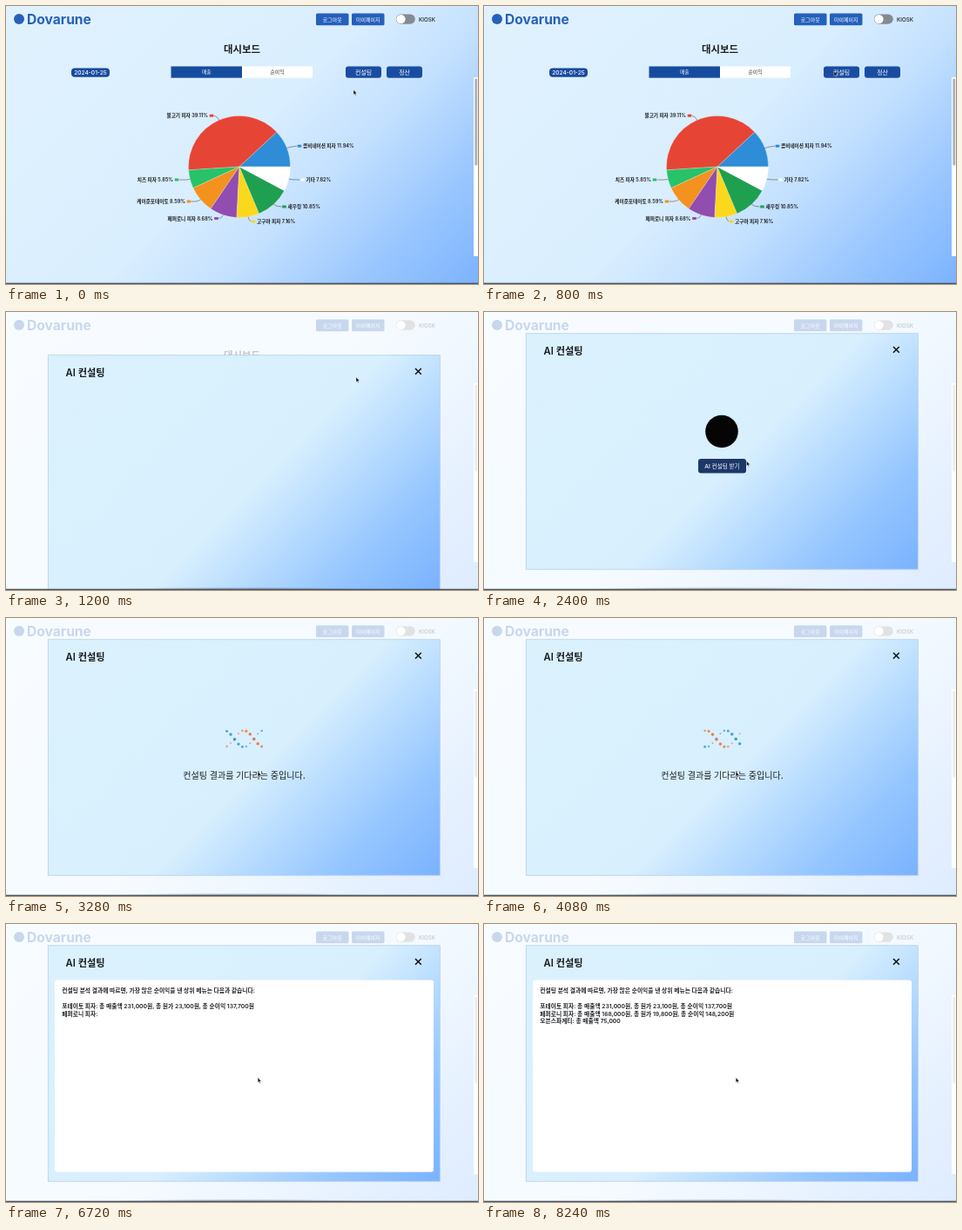
Animation, 542 px wide and 320 px high, one loop 8320 ms. Source, as an HTML page:

```html
<!DOCTYPE html>
<html lang="ko">
<head>
<meta charset="utf-8">
<title>대시보드</title>
<style>
  html, body { margin: 0; width: 100%; height: 100%; overflow: hidden; background: #dff1fe; }
  svg { display: block; width: 100%; height: 100%; }
  text { font-family: Inter, "Noto Sans CJK KR", "Noto Sans CJK", sans-serif; white-space: pre; }
</style>
</head>
<body>
<svg id="stage" viewBox="0 0 542 320" xmlns="http://www.w3.org/2000/svg">
  <defs>
    <linearGradient id="pageFill" gradientUnits="userSpaceOnUse" x1="55.5" y1="-55.5" x2="486.5" y2="375.5">
      <stop offset="0" stop-color="#e1f2fe"/><stop offset=".5" stop-color="#d9eefe"/>
      <stop offset=".66" stop-color="#c3e0ff"/><stop offset=".84" stop-color="#99c6ff"/>
      <stop offset="1" stop-color="#7cb3ff"/>
    </linearGradient>
    <linearGradient id="modalFill" gradientUnits="userSpaceOnUse" x1="92.5" y1="-20" x2="453.5" y2="341">
      <stop offset="0" stop-color="#dbf2fd"/><stop offset=".54" stop-color="#d8effe"/>
      <stop offset=".66" stop-color="#bbdeff"/><stop offset=".83" stop-color="#94c5ff"/>
      <stop offset="1" stop-color="#7ab2ff"/>
    </linearGradient>
    <radialGradient id="dockFill">
      <stop offset="0" stop-color="#4b5865" stop-opacity=".4"/>
      <stop offset=".6" stop-color="#4b5865" stop-opacity=".25"/>
      <stop offset="1" stop-color="#4b5865" stop-opacity="0"/>
    </radialGradient>
  </defs>
</svg>
<script>
const LOOP = 8320;
const stage = document.getElementById('stage');

function add(parent, tag, attrs, content) {
  const node = document.createElementNS('http://www.w3.org/2000/svg', tag);
  for (const key in attrs) node.setAttribute(key, attrs[key]);
  if (content !== undefined) node.textContent = content;
  parent.appendChild(node);
  return node;
}
const group = parent => add(parent, 'g', {});
const box = (parent, x, y, width, height, fill, rx = 0) =>
  add(parent, 'rect', { x, y, width, height, fill, rx });
// Text is placed by its vertical centre.
const label = (parent, x, cy, size, content, fill = '#222', weight = 500, anchor = 'start') =>
  add(parent, 'text', { x, y: cy + size * 0.36, 'font-size': size, fill, 'font-weight': weight,
    'text-anchor': anchor }, content);
function button(parent, x, y, w, h, fill, size, content, rx, weight = 500) {
  const rect = box(parent, x, y, w, h, fill, rx);
  label(parent, x + w / 2, y + h / 2, size, content, '#fff', weight, 'middle');
  return rect;
}
const show = (node, on) => node.setAttribute('visibility', on ? 'inherit' : 'hidden');

function drawHeader(page) {
  add(page, 'circle', { cx: 15, cy: 15, r: 6, fill: '#2760b8' });
  label(page, 24, 15.5, 15.6, 'Dovarune', '#2760b8', 700);
  button(page, 356, 8.5, 37.5, 13.8, '#2560ba', 6, '로그아웃', 1.5);
  button(page, 397, 8.5, 37.5, 13.8, '#2560ba', 6, '마이페이지', 1.5);
  box(page, 447.8, 9.5, 22, 11.2, '#858a90', 5.6);
  add(page, 'circle', { cx: 453.5, cy: 15.1, r: 5.2, fill: '#fff' });
  label(page, 474, 15.3, 6.2, 'KIOSK');

  label(page, 271, 50.2, 11.4, '대시보드', '#1b1d20', 600, 'middle');
  button(page, 75, 71.5, 44, 10.2, '#184a9f', 6.6, '2024-01-25', 4);
  button(page, 189.5, 69.5, 81.5, 13.2, '#164c9f', 5.8, '매출', 0);
  box(page, 271, 69.5, 81, 13.2, '#fff');
  label(page, 311.5, 76.1, 5.8, '순이익', '#333', 500, 'middle');
  button(page, 390, 69.5, 41, 13.2, '#1a4da1', 6.9, '컨설팅', 3);
  button(page, 437, 69.5, 41, 13.2, '#1a4da1', 6.9, '정산', 3);
}

function drawPie(page) {
  const cx = 268, cy = 185, r = 58.5;
  // name, percent, colour, label x, label y, side of the marker
  const slices = [
    ['콤비네이션 피자', 11.94, '#2e8dd6', 341, 161.2, 1],
    ['불고기 피자', 39.11, '#e64536', 232, 126.2, -1],
    ['치즈 피자', 5.85, '#28c268', 192, 200, -1],
    ['케이준포테이토', 8.59, '#f3921f', 206, 225, -1],
    ['페퍼로니 피자', 8.68, '#914db0', 237.5, 244.5, -1],
    ['고구마 피자', 7.16, '#fbd81d', 288, 248, 1],
    ['새우링', 10.85, '#1f9f50', 323.5, 231, 1],
    ['기타', 7.82, '#ffffff', 344.5, 200, 1]
  ];
  const point = (percent, radius) => {
    const a = -percent / 50 * Math.PI;
    return [cx + radius * Math.cos(a), cy + radius * Math.sin(a)];
  };
  let start = 0;
  for (const [name, percent, fill, x, y, side] of slices) {
    const end = start + percent, mid = (start + end) / 2;
    add(page, 'path', { fill, stroke: '#fff', 'stroke-width': .35, 'stroke-opacity': .7,
      d: `M${cx},${cy}L${point(start, r)}A${r},${r} 0 0 0 ${point(end, r)}Z` });
    const markX = x - side * 4;
    add(page, 'path', { fill: 'none', stroke: '#555', 'stroke-width': .6,
      d: `M${point(mid, r)}Q${point(mid, r + 4)} ${markX - side * 3},${y}` });
    box(page, markX - 2.3, y - 1.5, 4.6, 3, fill);
    label(page, x, y, 5.65, `${name} ${percent}%`, '#1c1c1c', 600, side > 0 ? 'start' : 'end');
    start = end;
  }
}

// Dashboard
const page = group(stage);
box(page, 0, 0, 542, 320, 'url(#pageFill)');
drawHeader(page);
drawPie(page);
box(page, 537, 82, 5, 206, '#fff');
box(page, 538.3, 83.5, 3, 100, '#aeb3b8', 1.5);

// Dialog
const overlay = group(stage);
box(overlay, 0, 0, 542, 320, '#fff').setAttribute('fill-opacity', .75);
const modal = group(overlay);
const frame = box(modal, 48.3, 24.8, 450, 271.4, 'url(#modalFill)');
frame.setAttribute('stroke', '#b2cfec');
frame.setAttribute('stroke-width', .8);
label(modal, 68.6, 44.6, 11.2, 'AI 컨설팅', '#16191d', 600);
add(modal, 'path', { d: 'M470,40l6.8,6.8m0,-6.8l-6.8,6.8', stroke: '#111', 'stroke-width': 1.5 });

const intro = group(modal);
add(intro, 'circle', { cx: 273, cy: 137.5, r: 18.8, fill: '#050505' });
const askButton = button(intro, 246, 169, 55, 16.6, '#1a4da1', 6.6, 'AI 컨설팅 받기', 3);

const waiting = group(modal);
label(waiting, 273.5, 181.3, 10.05, '컨설팅 결과를 기다리는 중입니다.', '#1d2126', 500, 'middle');
const dots = [];
for (let i = 0; i < 10; i++)
  for (const side of [1, -1])
    dots.push({ x: 253.6 + i * 4.45, side,
      node: add(waiting, 'circle', { fill: side > 0 ? '#f0783c' : '#3f9bd0' }) });

const result = group(modal);
box(result, 56, 64.5, 435, 221, '#fff', 3);
const answer = [
  '컨설팅 분석 결과에 따르면, 가장 많은 순이익을 낸 상위 메뉴는 다음과 같습니다:',
  '',
  '포테이토 피자: 총 매출액 231,000원, 총 원가 23,100원, 총 순이익 137,700원',
  '페퍼로니 피자: 총 매출액 168,000원, 총 원가 19,800원, 총 순이익 148,200원',
  '오븐스파게티: 총 매출액 75,000'
];
const lines = answer.map((_, i) => label(result, 64.3, 77 + i * 8.7, 6.75, '', '#1e2125', 600));

add(overlay, 'ellipse', { cx: 268, cy: 319.5, rx: 150, ry: 3, fill: 'url(#dockFill)' });
box(stage, 0, 318.7, 542, 1.3, '#465361');

const cursor = add(stage, 'path', { d: 'M0,0V5.6L1.3,4.5L2.2,6.5L3.1,6.1L2.2,4.2L3.9,4.1Z',
  fill: '#111', stroke: '#fff', 'stroke-width': .35 });

const smooth = u => u * u * (3 - 2 * u);
const linear = u => u;

// Interpolates rows of [time, ...values].
function track(keys, t, ease) {
  if (t <= keys[0][0]) return keys[0].slice(1);
  for (let i = 1; i < keys.length; i++) {
    const a = keys[i - 1], b = keys[i];
    if (t <= b[0]) {
      const u = ease((t - a[0]) / (b[0] - a[0]));
      return a.slice(1).map((v, k) => v + (b[k + 1] - v) * u);
    }
  }
  return keys[keys.length - 1].slice(1);
}

// The CSS "ease" curve.
function cssEase(x) {
  if (x <= 0) return 0;
  if (x >= 1) return 1;
  let lo = 0, hi = 1, s;
  for (let i = 0; i < 24; i++) {
    s = (lo + hi) / 2;
    if (.75 * s * (1 - s) + s ** 3 < x) lo = s; else hi = s;
  }
  return .3 * s * (1 - s) ** 2 + 3 * s * s * (1 - s) + s ** 3;
}

const OPEN = 819, SLIDE = 600, ASK = 2880, ANSWER = 4200;
const cursorKeys = [[80, 399, 96.5], [560, 402, 75], [1740, 402, 75],
  [2400, 301.5, 171.5], [2600, 289.2, 176.8]];
const typingKeys = [[ANSWER, 0], [4320, 5], [4960, 31.5], [5200, 44], [6080, 83.5],
  [6720, 109.3], [7840, 158.2], [8220, 175]];

function render(t) {
  show(overlay, t >= OPEN);
  modal.setAttribute('transform', `translate(0 ${272 * (1 - cssEase((t - OPEN) / SLIDE))})`);
  show(intro, t >= OPEN + SLIDE && t < ASK);
  show(waiting, t >= ASK && t < ANSWER);
  show(result, t >= ANSWER);
  askButton.setAttribute('fill', t >= 2360 ? '#1c3768' : '#1a4da1');

  for (const { x, side, node } of dots) {
    const phase = Math.PI * (x - 266.5) / 22.5 + (t - 4080) / 1000 * Math.PI;
    const depth = Math.cos(phase) * side;
    node.setAttribute('cx', x);
    node.setAttribute('cy', 139 + 9.5 * side * Math.sin(phase));
    node.setAttribute('r', 1.35 + .45 * depth);
    node.setAttribute('opacity', .8 + .2 * depth);
  }

  let left = Math.floor(track(typingKeys, t, linear)[0]);
  answer.forEach((line, i) => {
    lines[i].textContent = line.slice(0, Math.max(0, left));
    left -= line.length + 1;
  });

  cursor.setAttribute('transform', `translate(${track(cursorKeys, t, smooth).join(' ')})`);
}

const began = performance.now();
function tick() {
  render((performance.now() - began) % LOOP);
  requestAnimationFrame(tick);
}
render(0);
requestAnimationFrame(tick);
</script>
</body>
</html>
```
